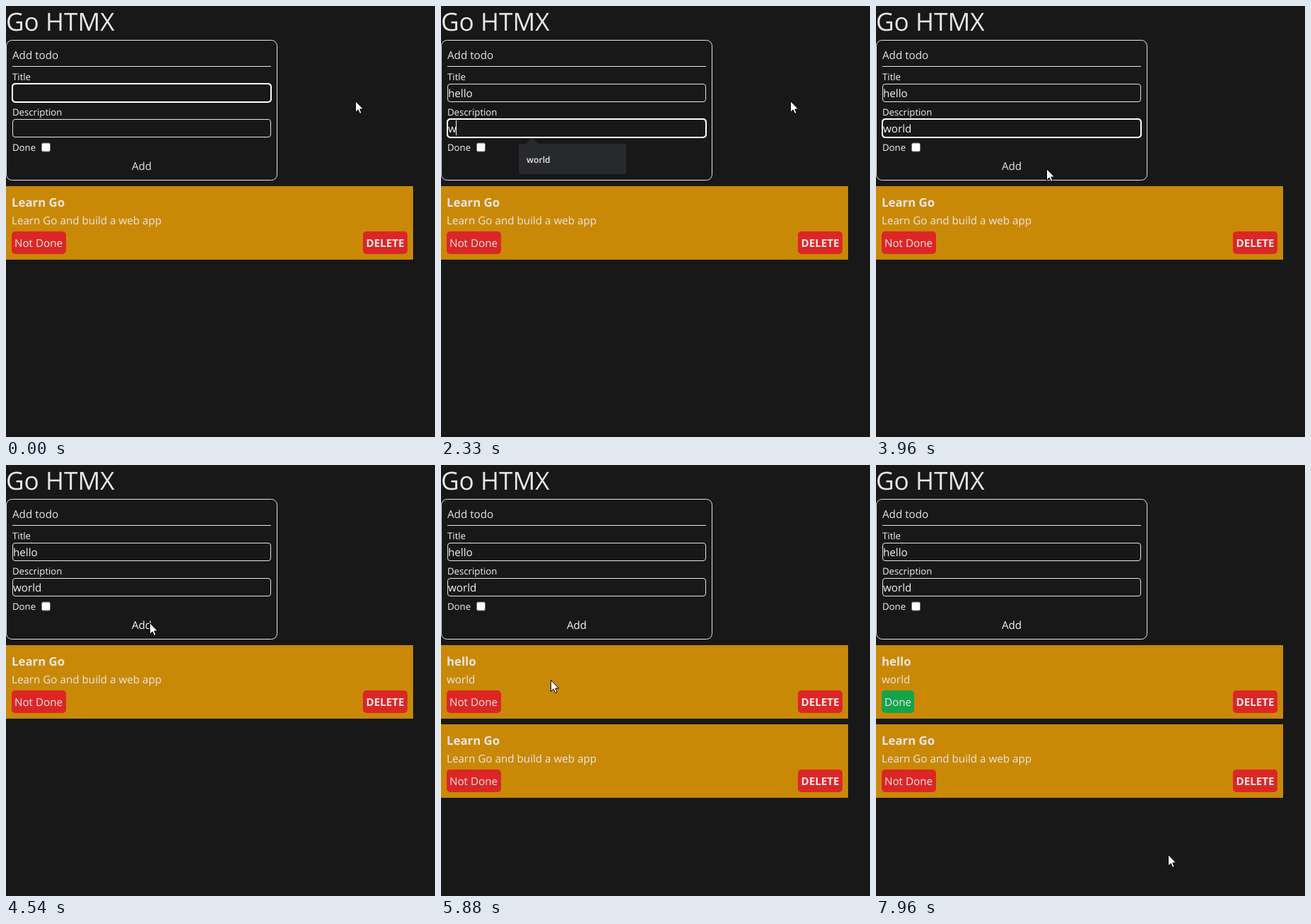
Recreate the animation shown at these times as an HTML page. Size 607x610 px, loop 8 s.

```html
<!DOCTYPE html>
<html lang="en">
<head>
<meta charset="utf-8">
<title>Todo list</title>
<style>
  html, body { margin: 0; width: 100%; height: 100%; overflow: hidden; background: #181818; }
  svg { display: block; width: 607px; height: 610px; }
  text {
    font: 15.2px "Open Sans", "Noto Sans", sans-serif;
    fill: #e7e7e7;
    text-rendering: geometricPrecision;
    white-space: pre;
  }
  .heading { font-size: 35.2px; }
  .label { font-size: 13.2px; fill: #f4f4f4; }
  .value { fill: #f4f4f4; }
  .name { font-size: 16.8px; font-weight: 700; }
  .strong { font-weight: 700; }
  .hint { font-size: 12.2px; font-weight: 600; }
  .line { fill: none; stroke: #e7e7e7; }
  .ring { fill: none; stroke: #fff; stroke-width: 2; }
  .red { fill: #dc2626; }
  .green { fill: #16a34a; }
  .middle { text-anchor: middle; }
</style>
</head>
<body>
<svg viewBox="0 0 607 610">
  <rect width="607" height="610" fill="#181818"/>
  <text class="heading" x="0" y="35">Go HTMX</text>

  <rect class="line" x=".5" y="48.5" width="383" height="198" rx="8"/>
  <text x="9" y="75">Add todo</text>
  <path class="line" d="M9 85.5H375"/>
  <text class="label" x="9" y="105">Title</text>
  <rect class="line" x="9.5" y="110.5" width="365" height="25" rx="3.5"/>
  <text class="value" id="title" x="10" y="129"></text>
  <text class="label" x="9" y="155">Description</text>
  <rect class="line" x="9.5" y="160.5" width="365" height="25" rx="3.5"/>
  <text class="value" id="description" x="10" y="179"></text>
  <rect class="ring" id="ring" x="9" y="110" width="366" height="26" rx="4"/>
  <rect id="caret" width="1" height="21" fill="#fff"/>
  <text class="label" x="9" y="205">Done</text>
  <rect x="50.5" y="194" width="12" height="12" rx="2" fill="#fff" stroke="#767676"/>
  <text class="middle" id="add" x="192" y="232">Add</text>

  <g id="popup">
    <path fill="#28292c" d="M114 195H120L129 187L138 195H258Q262 195 262 199V234Q262 238 258 238H114Q110 238 110 234V199Q110 195 114 195Z"/>
    <text class="hint" x="121" y="222">world</text>
  </g>

  <g id="cards"></g>

  <path id="cursor" fill="#fff" stroke="#000" stroke-linejoin="round"
    d="M.5 .5V16.5L4.2 13L6.7 18.5L9.2 17.4L6.8 12H11.6Z"/>
</svg>
<script>
const LOOP = 8000;
const FPS = 24;
const $ = id => document.getElementById(id);

const badge = (cls, label, width) => `<g class="badge">
  <rect class="${cls}" x="8" y="64" width="${width}" height="32" rx="5"/>
  <text x="12" y="86">${label}</text></g>`;

const card = (id, name, details) => `<g id="${id}">
  <rect width="576" height="104" fill="#c98907"/>
  <text class="name" x="8" y="29">${name}</text>
  <text x="8" y="54">${details}</text>
  ${badge("red", "Not Done", 77)}${badge("green", "Done", 46)}
  <rect class="red" x="505" y="64" width="63" height="32" rx="5"/>
  <text class="strong middle" x="536.5" y="86">DELETE</text></g>`;

$("cards").innerHTML =
  card("newCard", "hello", "world") +
  card("oldCard", "Learn Go", "Learn Go and build a web app");

// All times below are ticks of 1/24 s.
const keys = {
  title: { word: "hello", ticks: [25, 28, 33, 39, 42] },
  description: { word: "world", ticks: [56, 59, 69, 73, 76] }
};
const FOCUS_NEXT = 48, CARET_OFF = 88, PRESS = 109, ADDED = 113, TOGGLED = 176;
const POPUP = { show: 56, fade: 76, hide: 80 };

// [tick, x, y]
const path = [
  [0, 494, 134], [85, 494, 134], [88, 450, 152], [92, 310, 212], [95, 241, 230],
  [98, 213, 230], [102, 203, 223], [132, 203, 223], [135, 217, 240], [137, 216, 260],
  [141, 155, 304], [145, 97, 325], [150, 71, 330], [175, 71, 330], [176, 72, 334],
  [179, 72, 334], [182, 112, 355], [187, 300, 472], [191, 413, 551], [192, 413, 551]
];

function cursorAt(tick) {
  const i = path.findIndex(p => p[0] > tick);
  const [t0, x0, y0] = path[i - 1], [t1, x1, y1] = path[i];
  const k = (tick - t0) / (t1 - t0);
  return [x0 + (x1 - x0) * k, y0 + (y1 - y0) * k].map(Math.round);
}

const show = (el, on) => { el.style.display = on ? "" : "none"; };

function showBadge(id, done) {
  const [open, closed] = $(id).querySelectorAll(".badge");
  show(open, !done);
  show(closed, done);
}

function draw(tick) {
  for (const [id, { word, ticks }] of Object.entries(keys))
    $(id).textContent = word.slice(0, ticks.filter(t => t <= tick).length);

  const field = tick < FOCUS_NEXT ? "title" : "description";
  const offset = field === "title" ? 0 : 50;
  const input = $(field);
  show($("ring"), tick < PRESS);
  $("ring").setAttribute("y", 110 + offset);
  show($("caret"), input.textContent && tick < CARET_OFF);
  $("caret").setAttribute("x", Math.floor(9.4 + input.getComputedTextLength()));
  $("caret").setAttribute("y", 112 + offset);
  $("add").style.fill = tick < PRESS ? "" : "#f8f8f8";

  const faded = (tick - POPUP.fade) / (POPUP.hide - POPUP.fade);
  show($("popup"), tick >= POPUP.show && tick < POPUP.hide);
  $("popup").style.opacity = 1 - Math.max(0, faded) * 1.5;

  const added = tick >= ADDED;
  show($("newCard"), added);
  $("newCard").setAttribute("transform", "translate(0 255)");
  $("oldCard").setAttribute("transform", `translate(0 ${added ? 367 : 255})`);
  showBadge("newCard", tick >= TOGGLED);
  showBadge("oldCard", false);

  $("cursor").setAttribute("transform", `translate(${cursorAt(tick)})`);
}

const start = performance.now();
function loop() {
  const ms = (performance.now() - start) % LOOP;
  draw(Math.min(191, Math.floor(ms * FPS / 1000 + 0.1)));
  requestAnimationFrame(loop);
}
loop();
</script>
</body>
</html>
```
